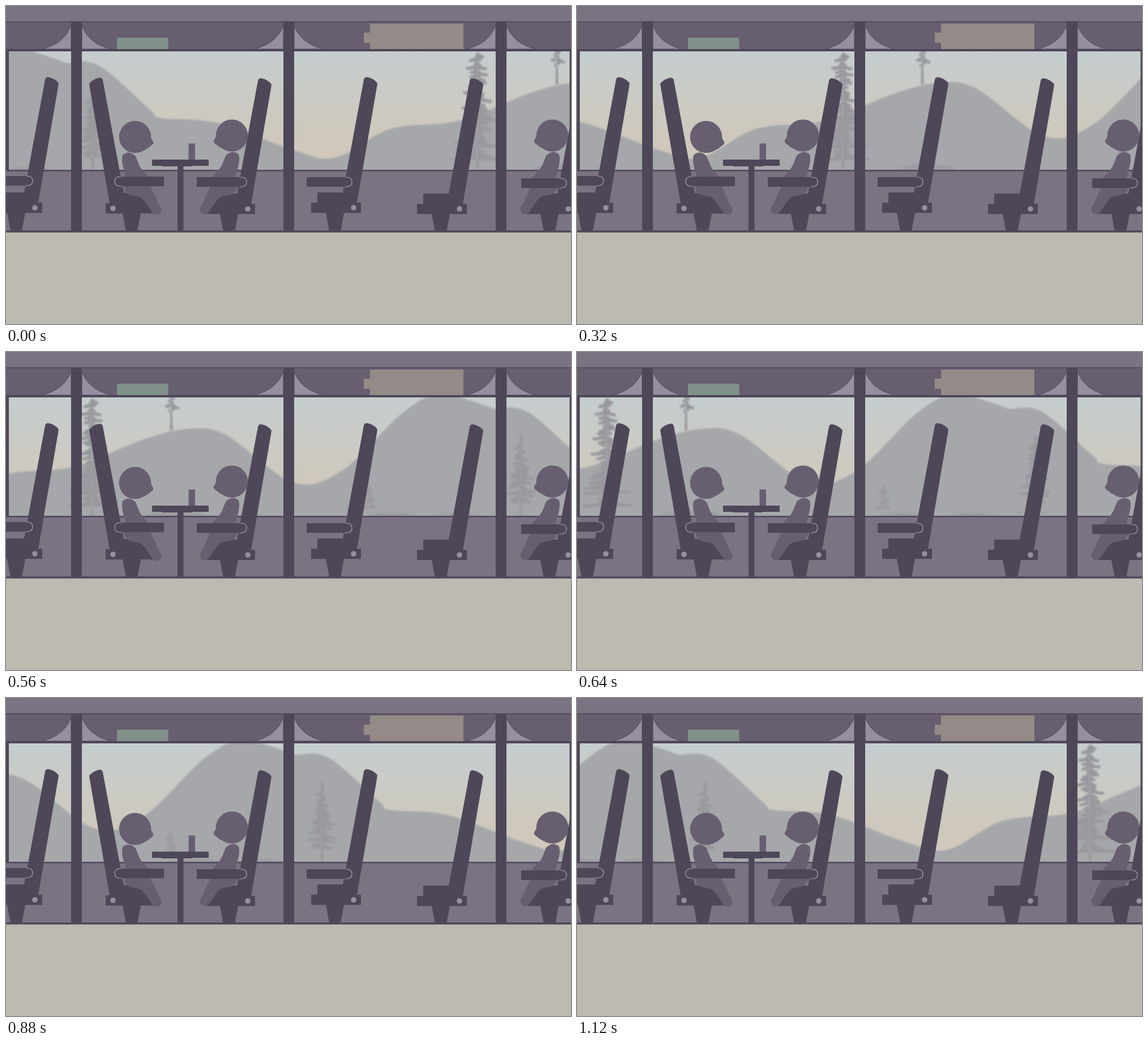
Write an HTML page that moves like this. It is 998 px wide and 561 px high and loops after 1200 ms.

```html
<!DOCTYPE html>
<html lang="en">
<head>
<meta charset="utf-8">
<title>Train window</title>
<style>
  html, body { margin: 0; width: 100%; height: 100%; overflow: hidden; }
  svg { display: block; width: 100vw; height: 100vh; }
  .dark { fill: #4e4758; }
  .wall { fill: #7b7282; }
  .panel, .person { fill: #675f70; }
  .curtain { fill: #978f9f; stroke: #4e4758; }
  .pin { fill: #978f9f; }
  .trim { fill: none; stroke: #aaa4b0; stroke-width: 1.2; }
  .hill { fill: #a6a7aa; stroke: #a6a7aa; }
  .mound { fill: #9d9ca1; }
</style>
</head>
<body>
<svg viewBox="0 0 998 561" preserveAspectRatio="none">
  <defs>
    <linearGradient id="sky" x1="0" y1="80" x2="0" y2="270" gradientUnits="userSpaceOnUse">
      <stop offset="0" stop-color="#c5cdcf"/>
      <stop offset=".4" stop-color="#cacbc5"/>
      <stop offset=".7" stop-color="#cec9be"/>
      <stop offset="1" stop-color="#d1c8bb"/>
    </linearGradient>
    <linearGradient id="bark" x1="0" y1="80" x2="0" y2="288" gradientUnits="userSpaceOnUse">
      <stop offset="0" stop-color="#96969c"/>
      <stop offset="1" stop-color="#9b999f"/>
    </linearGradient>
    <filter id="haze" filterUnits="userSpaceOnUse" x="-20" y="60" width="1040" height="260">
      <feGaussianBlur stdDeviation="1.7"/>
    </filter>
    <g id="land"></g>

    <!-- facing left, origin at the pivot -->
    <g id="seat">
      <path class="dark" d="M-75-9H-64V-27H-19L18-226Q19-231 24-230.500Q36-228 42-220L41-213L6-9H13V9H-17L-23 41H-43L-49 9H-75Z"/>
      <circle class="pin" r="4.800"/>
    </g>
    <g id="head" class="person">
      <circle cx="399" cy="228.500" r="28.300"/>
      <path d="M371 230L366.500 238Q367 242 371 244Q381 254 400 256L410 235Z"/>
    </g>
    <g id="body" class="person">
      <path d="M388 264Q400 252 411 262Q413 268 411 280L404 305H360Q380 288 384 274Z"/>
      <path d="M362 317H408Q407 332 391 334Q378 334 371 345L358 364Q352 370 346 366Q341 361 343 355Q348 349 352 337Z"/>
    </g>
  </defs>

  <rect width="998" height="300" fill="url(#sky)"/>
  <g filter="url(#haze)"><g id="view"></g></g>

  <rect class="wall" width="998" height="28"/>
  <rect class="panel" y="28" width="998" height="49"/>
  <rect x="196" y="56" width="90.500" height="21" fill="#81918a"/>
  <path d="M643 31H808V76H643V65H632V47H643Z" fill="#948a87"/>
  <rect class="wall" y="290" width="998" height="108"/>
  <rect y="399" width="998" height="162" fill="#bdbab2"/>
  <g id="frame"></g>
  <g id="seats"></g>

  <use href="#head"/>
  <use href="#body"/>
  <use href="#head" x="566"/>
  <use href="#body" x="566"/>
  <use href="#head" transform="translate(627 2.500) scale(-1 1)"/>
  <use href="#body" transform="translate(617 1) scale(-1 1)"/>
  <g id="rests"></g>

  <rect class="panel" x="322.500" y="242.500" width="11.500" height="29"/>
  <path class="dark" d="M258 271H358V282H328V283H313.500V397H303V283H276V282H258Z"/>
</svg>
<script>
const LOOP = 1200, STEP = 80, PERIOD = 1437;
const $ = id => document.getElementById(id);
const rect = (x, y, w, h) => `<rect class="dark" x="${x}" y="${y}" width="${w}" height="${h}"/>`;
const use = (id, x, y, flip) =>
  `<use href="#${id}" transform="translate(${x} ${y}) scale(${flip ? -1 : 1} 1)"/>`;

// Key points of the skyline over one period
const ridge = [
  [107, 101], [165, 106], [254, 183], [274, 198], [375, 207], [509, 255], [582, 268],
  [680, 217], [800, 203], [923, 155], [1003, 136], [1070, 147], [1187, 230],
  [1274, 210], [1380, 109], [1445, 74], [1500, 86], [1544, 101]
];

// Catmull-Rom spline through the points
function spline(pts) {
  let d = `M${pts[0]}`;
  for (let i = 0; i < pts.length - 1; i++) {
    const b = pts[i], c = pts[i + 1], a = pts[i - 1] || b, e = pts[i + 2] || c;
    d += `C${b.map((v, j) => v + (c[j] - a[j]) / 6)} ${c.map((v, j) => v - (e[j] - b[j]) / 6)} ${c}`;
  }
  return d;
}

function random(seed) {
  return () => (seed = seed * 16807 % 2147483647) / 2147483647;
}

// Conifer with ragged branches from y0 to y1, reaching w0 at the top and w1 below
function tree(x, top, base, y0, y1, w0, w1, seed) {
  const rnd = random(seed);
  let d = `M${x} ${top}L${x + 2.5} ${base}H${x - 2.5}Z`;
  for (let y = y0; y < y1; y += 7) {
    const reach = w0 + (w1 - w0) * (y - y0) / (y1 - y0);
    for (const side of [-1, 1]) {
      const len = side * reach * (.25 + .75 * rnd() ** 1.5);
      const tip = y + 2 + 6 * rnd();
      d += `M${x} ${y - 5}Q${x + len * .5} ${tip - 3} ${x + len} ${tip - 3}`
         + `L${x + len * .9} ${tip + 2}Q${x + len * .4} ${tip + 1} ${x} ${y + 5}Z`;
    }
  }
  return `<path d="${d}" fill="url(#bark)"/>`;
}

const mound = (x, w, h) => `<ellipse class="mound" cx="${x}" cy="290" rx="${w}" ry="${h}"/>`;

$('land').innerHTML =
  `<path class="hill" d="${spline(ridge)}V310H107Z"/>` +
  mound(980, 52, 11) + mound(1364, 46, 6) + mound(1480, 42, 6) +
  tree(833, 60, 290, 85, 268, 18, 50, 71) +
  tree(973, 50, 138, 78, 106, 16, 20, 23) +
  tree(1323, 227, 276, 236, 272, 8, 24, 11) +
  tree(153 + PERIOD, 138, 290, 150, 268, 10, 38, 47);
// Later copies lie behind, so that trees near the seam stay in front
$('view').innerHTML = [1, 0, -1].map(n => use('land', n * PERIOD, 0)).join('');

// Armrest with a rounded right end
function rest(right, width, y) {
  const end = `H${right - 10}q10 0 10 8.500t-10 8.500`;
  return `<path class="dark" d="M${right - width} ${y}${end}H${right - width}Z"/>` +
         `<path class="trim" d="M${right - 11} ${y}${end}h-3"/>`;
}

const curtain = (x, dir) =>
  `<path class="curtain" d="M${x} 34Q${x + 12 * dir} 67 ${x + 52 * dir} 76H${x}Z"/>`;

$('frame').innerHTML =
  [115, 490, 865].map(x => curtain(x, -1) + curtain(x + 19, 1) + rect(x, 28, 19, 370)).join('') +
  rect(0, 27, 998, 1.5) + rect(0, 76, 998, 4) + rect(0, 289, 998, 2.5) + rect(0, 396, 998, 3.5) +
  rect(0, 78, 5, 212) + rect(995.5, 78, 3, 212);

$('seats').innerHTML =
  use('seat', 51, 356) + use('seat', 427, 358) + use('seat', 614, 356) +
  use('seat', 801, 358) + use('seat', 993, 358) + use('seat', 189, 357, true);

$('rests').innerHTML =
  rest(47, 80, 300) + rest(425, 88, 302) + rest(611, 80, 302) + rest(990, 80, 304) +
  `<g transform="scale(-1 1)">${rest(-192, 87, 301)}</g>`;

// [step, distance]: the ride is slightly uneven
const ride = [[0, 0], [2, 184], [4, 363], [7, 681], [9, 880], [11, 1032], [14, 1364], [15, PERIOD]];

function travelled(step) {
  const i = ride.findIndex(p => p[0] > step);
  const [s0, d0] = ride[i - 1], [s1, d1] = ride[i];
  return d0 + (d1 - d0) * (step - s0) / (s1 - s0);
}

function draw() {
  const step = Math.floor(performance.now() % LOOP / STEP);
  $('view').setAttribute('transform', `translate(${-travelled(step)} 0)`);
  requestAnimationFrame(draw);
}
draw();
</script>
</body>
</html>
```
